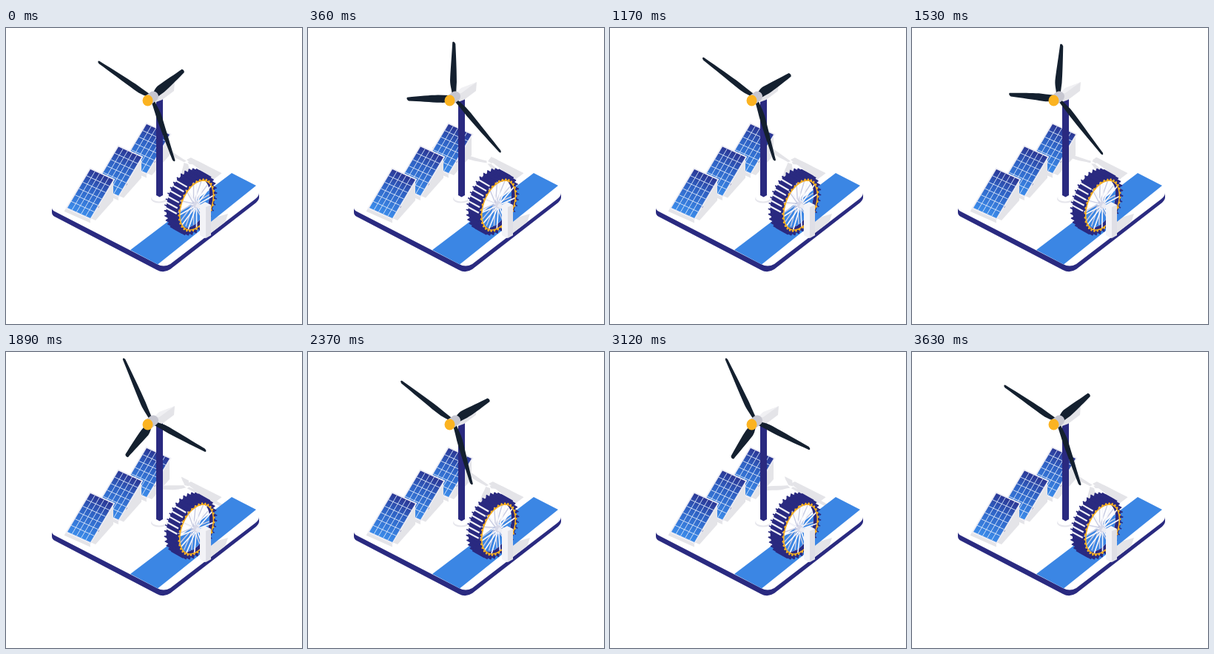
Animation, 400 px wide and 400 px high, one loop 3660 ms. Source, as an HTML page with a canvas:

```html
<!DOCTYPE html>
<html lang="en">
<head>
<meta charset="utf-8">
<title>Renewable energy</title>
<style>
html, body { margin: 0; width: 100%; height: 100%; overflow: hidden; background: #fff; }
canvas { display: block; width: 400px; height: 400px; }
</style>
</head>
<body>
<canvas id="stage"></canvas>
<script>
const LOOP = 3660, STEP = 30, TURN = 3630, TAU = Math.PI * 2;
const NAVY = '#2a2a80', BLUE = '#3b86e4', DARK = '#14202f',
      GOLD = '#fbb321', SHADE = '#e4e4e8', PALE = '#f3f3f7';

const canvas = document.getElementById('stage');
const ctx = canvas.getContext('2d');
const dpr = window.devicePixelRatio || 1;
canvas.width = canvas.height = 400 * dpr;

const ground = new Path2D('M66 248Q58 243 66 238L182 151Q191 145 200 150L337 219Q346 224 337 231L222 319Q213 325 204 319Z');
const edge = new Path2D('M62 243Q62 246 66 248L204 319Q213 324 222 319L337 231Q342 227 342 223V229Q342 232 338 236L222 326Q213 332 204 327L66 255Q62 253 62 249Z');
const river = new Path2D('M168 300L305 196L338 213L205 319.5Z');
const blade = new Path2D('M3 -3C13 -4 19 -8 32 -7C52 -6 78 -4 98 -3Q102 0 98 2.5C70 4 48 5 31 5Q14 4 3 4Z');

function poly(points, fill) {
  ctx.beginPath();
  points.forEach(p => ctx.lineTo(p[0], p[1]));
  ctx.closePath();
  ctx.fillStyle = fill;
  ctx.fill();
}

function line(a, b, color, width) {
  ctx.beginPath();
  ctx.moveTo(a[0], a[1]);
  ctx.lineTo(b[0], b[1]);
  ctx.strokeStyle = color;
  ctx.lineWidth = width;
  ctx.stroke();
}

function dot(x, y, rx, ry, fill) {
  ctx.beginPath();
  ctx.ellipse(x, y, rx, ry, 0, 0, TAU);
  ctx.fillStyle = fill;
  ctx.fill();
}

function panel(x, y) {
  const at = (u, v) => [x + 31 * u - 31 * v, y + 14 * u + 52 * v];
  poly([at(1, 0), at(1, 1), [x + 7, y + 69], [x + 31, y + 42]], SHADE);
  poly([at(-.04, 1.03), at(1.02, 1.03), at(1.1, 1.1), at(-.04, 1.1)], SHADE);
  dot(x + 10, y + 50, 1.6, 2, NAVY);
  poly([at(-.05, -.03), at(1.05, -.03), at(1.05, 1.03), at(-.05, 1.03)], '#ececf4');
  const shade = ctx.createLinearGradient(x + 15, y, x - 15, y + 58);
  shade.addColorStop(0, '#2b2c88');
  shade.addColorStop(.45, '#2f62c4');
  shade.addColorStop(1, '#3b8ae8');
  poly([at(0, 0), at(1, 0), at(1, 1), at(0, 1)], shade);
  for (let i = 1; i < 5; i++) line(at(i / 5, 0), at(i / 5, 1), '#dce8fa', .9);
  for (let i = 1; i < 6; i++) line(at(0, i / 6), at(1, i / 6), '#dce8fa', .9);
}

// Three blades in the plane spanned by (ux, uy) and (vx, vy)
function blades(cx, cy, ux, uy, vx, vy, turn, fill) {
  ctx.fillStyle = fill;
  for (let k = 0; k < 3; k++) {
    ctx.save();
    ctx.transform(ux / 100, uy / 100, vx / 100, vy / 100, cx, cy);
    ctx.rotate(turn + k * TAU / 3);
    ctx.fill(blade);
    ctx.restore();
  }
}

function turbine(turn) {
  dot(207, 231, 11, 5.5, '#e6e6ec');
  dot(207, 229.5, 10, 5, '#fff');
  poly([[203, 97], [212, 95], [212, 226], [207.5, 228.5], [203, 226]], NAVY);
  poly([[199, 89], [228, 73], [227, 85], [211, 97], [203, 100]], SHADE);
  poly([[199, 89], [207, 81], [228, 73], [207, 88]], '#f0f0f3');
  blades(197.2, 94.3, 73.3, 41.5, 0, 75.6, turn, DARK);
  ctx.lineCap = 'round';
  line([193, 97], [199, 92.5], '#c6c6d0', 14);
  ctx.lineCap = 'butt';
  dot(191.5, 98, 7, 7.5, GOLD);
}

// Point on the water wheel: radius, angle, depth towards the far rim
const rim = (r, a, d = 0) => [
  257.5 + 23.5 * r * Math.cos(a) - 16 * d,
  239.5 - 13.5 * r * Math.cos(a) + 31.7 * r * Math.sin(a) - 9 * d
];

function ring(r, d = 0) {
  const path = new Path2D();
  for (let i = 0; i < 60; i++) path.lineTo(...rim(r, i * TAU / 60, d));
  path.closePath();
  return path;
}

function wheel(turn) {
  const count = 32, outer = 1.18;
  ctx.fillStyle = NAVY;
  for (let d = 0; d <= 1; d += .1) ctx.fill(ring(1.06, d));
  for (let i = 0; i < count; i++) {
    const a = (turn + i * TAU / count) % TAU;
    poly([rim(1, a - .05), rim(outer, a), rim(outer, a, 1), rim(1, a - .05, 1)], NAVY);
    line(rim(outer, a), rim(outer, a, 1), NAVY, 1.6);
  }
  for (let i = 0; i < count; i++) {
    const a = (turn + (i + .5) * TAU / count) % TAU;
    if (a > 3.2 && a < 4.3) line(rim(1.13, a, .02), rim(1.15, a, .98), '#f1f1f8', 2.2);
  }

  ctx.save();
  ctx.clip(ring(.95));
  ctx.clip(ring(.95, .3));
  ctx.fillStyle = '#fff';
  ctx.fillRect(200, 180, 100, 110);
  ctx.fillStyle = BLUE;
  ctx.fill(river);
  ctx.restore();

  const spokes = 12;
  for (let i = 0; i < spokes; i++) {
    const a = turn + i * TAU / spokes;
    line(rim(0, 0, .25), rim(.9, a, .25), '#c9cce2', 1.5);
  }
  for (let i = 0; i < spokes; i++) {
    const a = turn + i * TAU / spokes;
    line(rim(0, 0), rim(.96, a), '#f6f6fb', 1.7);
  }
  ctx.strokeStyle = GOLD;
  ctx.lineWidth = 1.5;
  ctx.stroke(ring(.97));
  for (let i = 0; i < count; i++) {
    dot(...rim(1.01, turn + i * TAU / count), 1.3, 1.5, GOLD);
  }
  dot(257, 239, 4, 5, '#d6d8e8');
  line([257, 239], [268, 245], '#ececf3', 5);
  poly([[262, 239], [269, 235], [277, 239], [277, 280], [269, 284], [262, 280]], PALE);
  poly([[270, 242], [277, 239], [277, 280], [270, 284]], '#dfdfe6');
}

function draw(time) {
  const angle = TAU * Math.floor(time % LOOP / STEP) * STEP / TURN;
  const turn = 65.9 * TAU / 360 - angle;
  ctx.setTransform(dpr, 0, 0, dpr, 0, 0);
  ctx.fillStyle = '#fff';
  ctx.fillRect(0, 0, 400, 400);

  ctx.fillStyle = NAVY;
  ctx.fill(edge);
  ctx.save();
  ctx.clip(ground);
  blades(244, 182, 73, 41, -40, 25, turn, SHADE);
  poly([[244, 178], [258, 171], [297, 192], [280, 205]], SHADE);
  poly([[276, 258], [300, 251], [296, 263], [274, 286], [268, 284]], SHADE);
  ctx.restore();
  ctx.fillStyle = BLUE;
  ctx.fill(river);

  for (let i = 2; i >= 0; i--) panel(114 + 38 * i, 191 - 30.5 * i);
  turbine(turn);
  wheel(angle);
}

const start = performance.now();
function tick() {
  draw(performance.now() - start);
  requestAnimationFrame(tick);
}
tick();
</script>
</body>
</html>
```
